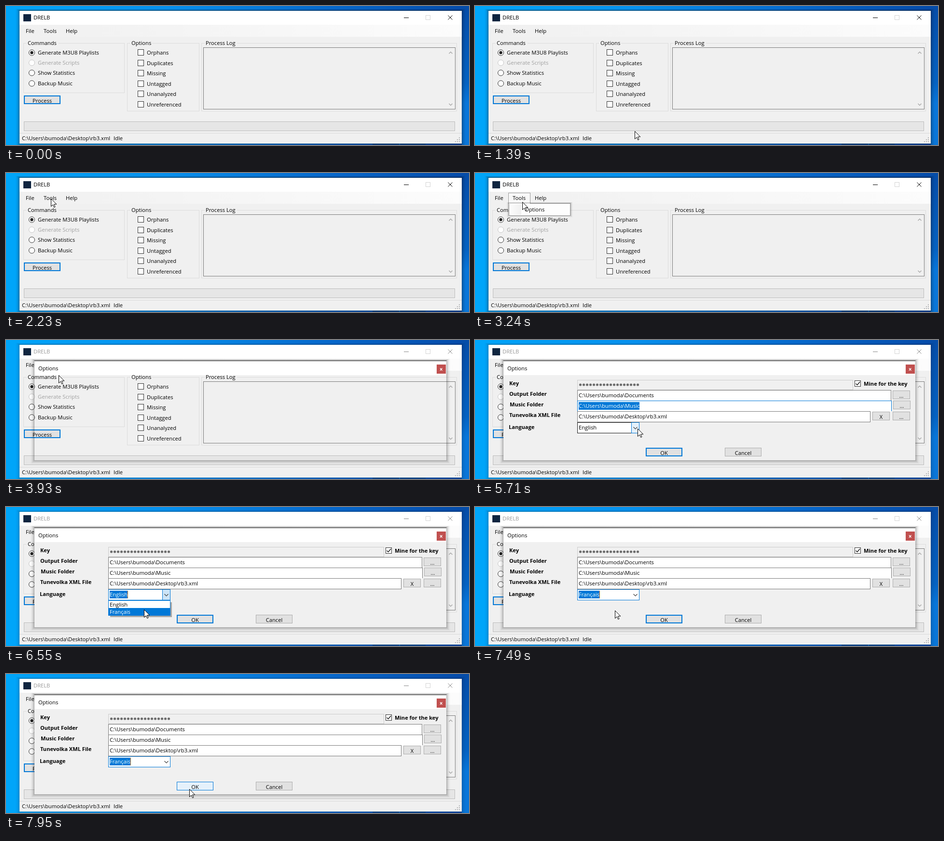
An HTML page for the animation above (8000 ms loop, 960x289 px).

```html
<!DOCTYPE html>
<html lang="en">
<head>
<meta charset="utf-8">
<title>Options dialog</title>
<style>
  html, body { margin: 0; width: 100%; height: 100%; overflow: hidden; background: #0a78dc; }
  svg { display: block; width: 100vw; height: 100vh; }
  text { font: 11.2px "Open Sans", "Noto Sans", sans-serif; fill: #000; white-space: pre; }
  text.bold { font-weight: 700; font-size: 11.1px; }
  rect { shape-rendering: crispEdges; }
</style>
</head>
<body>
<svg id="stage" viewBox="0 0 960 289" xmlns="http://www.w3.org/2000/svg"></svg>
<script>
const LOOP = 8000;
const BLUE = '#0078d7', HOT = '#e5f1fb', PRESSED = '#cce4f7', GRAY = '#7a7a7a', FACE = '#f0f0f0';
const HOME = String.raw`C:\Users\bumoda`;
const XML_PATH = HOME + String.raw`\Desktop\rb3.xml`;

// Markup helpers; box edges are given as left, top, right, bottom.
const fill = (x, y, r, b, color, extra = '') =>
  `<rect x="${x}" y="${y}" width="${r - x}" height="${b - y}" fill="${color}" ${extra}/>`;
const box = (x, y, r, b, color, edge, extra = '') =>
  `<rect x="${x + .5}" y="${y + .5}" width="${r - x - 1}" height="${b - y - 1}" fill="${color}" stroke="${edge}" ${extra}/>`;
const text = (x, y, str, extra = '') => `<text x="${x}" y="${y}" ${extra}>${str}</text>`;
const bold = (x, y, str) => text(x, y, str, 'class="bold"');
const path = (d, color = '#000', width = 1, extra = '') =>
  `<path d="${d}" fill="none" stroke="${color}" stroke-width="${width}" ${extra}/>`;
const group = (id, content) => `<g id="${id}">${content}</g>`;

const shadow = (x, y, r, b, size, strength) => Array.from({ length: size }, (_, i) =>
  `<rect x="${x - i - .5}" y="${y - i * .5 - .5}" width="${r - x + 2 * i + 1}" height="${b - y + 1.5 * i + 1}"
    fill="none" stroke="#000" opacity="${strength * (1 - i / size) ** 2}"/>`).join('');

const button = (x, y, label, width = 36, edge = '#adadad', extra = '') =>
  box(x, y, x + width, y + 18, '#e1e1e1', edge, extra) +
  text(x + width / 2, y + 15, label, 'text-anchor="middle"');

const defaultButton = (x, y, label, id) =>
  button(x, y, label, 76, BLUE, `id="${id}"`) +
  box(x + 1, y + 1, x + 75, y + 17, 'none', BLUE, `id="${id}Ring"`);

const frame = (x, y, r, b, label, labelWidth) =>
  box(x, y, r, b, 'none', '#dcdcdc') +
  fill(x + 7, y - 2, x + 9 + labelWidth, y + 3, FACE) + text(x + 9, y + 4, label);

const radio = (y, label, state = '') => {
  const off = state === 'off';
  return `<circle cx="53.5" cy="${y}" r="6" fill="#fff" stroke="${off ? '#c4c4c4' : '#333'}"/>` +
    (state === 'on' ? `<circle cx="53.5" cy="${y}" r="3.2" fill="#222"/>` : '') +
    text(66, y + 4, label, off ? 'style="fill:#a0a0a0"' : '');
};

const check = (y, label) => box(273, y - 7, 286, y + 6, '#fff', '#333') + text(292, y + 4, label);

const desktop = `
  <defs>
    <linearGradient id="sky"><stop stop-color="#00a6fa"/><stop offset=".35" stop-color="#0690ee"/>
      <stop offset=".7" stop-color="#0668cc"/><stop offset="1" stop-color="#054aa8"/></linearGradient>
    <linearGradient id="side" x2="0" y2="1"><stop stop-color="#054ca8"/><stop offset=".55" stop-color="#0562c2"/>
      <stop offset=".7" stop-color="#0876da"/><stop offset="1" stop-color="#0a76d8"/></linearGradient>
    <linearGradient id="bar"><stop stop-color="${FACE}"/><stop offset="1" stop-color="#fcfcfc"/></linearGradient>
    <linearGradient id="margin"><stop stop-color="#fcfcfc"/><stop offset="1" stop-color="#f0f0f0"/></linearGradient>
  </defs>` +
  fill(0, 0, 960, 289, 'url(#sky)') + fill(945, 0, 960, 289, 'url(#side)') +
  fill(760, 286, 870, 289, '#0a4f98') + fill(815, 286, 817, 289, '#1b6fc0');

const grip = [[0, 0], [4, 0], [8, 0], [4, -4], [8, -4], [8, -8]]
  .map(([x, y]) => fill(931 + x, 281 + y, 933 + x, 283 + y, '#b4b4b4')).join('');

const mainWindow =
  group('mainShadow', shadow(28, 10, 945, 286, 9, .3)) +
  fill(28, 10, 945, 286, FACE) + fill(28, 10, 945, 39, '#fff') + fill(28, 39, 945, 64, 'url(#bar)') +
  fill(36, 17, 52, 32, '#0f2540') +
  text(57, 28, 'DRELB', 'id="title"') +
  group('controls', path('M825 24.5h10M916.5 19.5l9 9m0-9l-9 9', 'currentColor')) +
  box(870, 19, 880, 29, 'none', '#d4d4d4') +
  text(41, 56, 'File') +
  group('toolsHot', box(69, 41, 115, 63, '#b3d7f3', BLUE)) +
  group('toolsOpen', box(69, 41, 115, 64, '#f8f8f8', '#9b9b9b')) +
  text(78, 56, 'Tools') + text(124, 56, 'Help') +
  frame(36, 77, 246, 181, 'Commands', 64) +
  radio(97, 'Generate M3U8 Playlists', 'on') + radio(118, 'Generate Scripts', 'off') +
  radio(139, 'Show Statistics') + radio(161, 'Backup Music') +
  frame(251, 77, 401, 219, 'Options', 43) +
  ['Orphans', 'Duplicates', 'Missing', 'Untagged', 'Unanalyzed', 'Unreferenced']
    .map((label, i) => check(Math.round(97 + i * 21.6), label)).join('') +
  frame(405, 77, 935, 219, 'Process Log', 65) +
  box(409, 86, 932, 215, FACE, GRAY) +
  path('M918.5 99l3.5-3.5 3.5 3.5M918.5 203l3.5 3.5 3.5-3.5', '#aaa', 1.5) +
  defaultButton(37, 186, 'Process', 'process') +
  box(37, 240, 931, 260, '#e6e6e6', '#bcbcbc') +
  fill(28, 264, 945, 265, '#d9d9d9') +
  text(33, 279, XML_PATH) + text(223, 279, 'Idle') + grip;

const toolsMenu = group('menu',
  shadow(70, 63, 198, 88, 5, .22) + box(70, 63, 198, 89, '#fdfdfd', '#9b9b9b') +
  fill(72, 65, 96, 87, 'url(#margin)') + fill(70, 63, 114, 64, '#f8f8f8') +
  group('menuHot', box(72, 65, 196, 87, '#b3d7f3', BLUE)) + text(103, 80, 'Options'));

const dots = Array.from({ length: 18 }, (_, i) =>
  `<circle cx="${218.5 + i * 7}" cy="93" r="2.6" fill="#6d6d6d"/>`).join('');

const dialogBody = group('body',
  fill(59, 73, 913, 250, FACE) +
  bold(71, 94, 'Key') + bold(71, 116, 'Output Folder') + bold(72, 138, 'Music Folder') +
  bold(71, 160, 'Tunevolka XML File') + bold(70, 185, 'Language') +
  box(212, 83, 784, 104, FACE, '#ccc') + dots +
  box(787, 84, 800, 97, '#fff', '#333') + path('M789.5 90.5l3 3 5.5-6.5', '#111', 1.4) +
  bold(806, 95, 'Mine for the key') +
  box(212, 104, 863, 127, '#fff', GRAY) + text(215, 119, HOME + '\\Documents') +
  box(212, 126, 864, 149, '#fff', GRAY, 'id="musicBox"') + fill(820, 148, 864, 149, '#fff') +
  fill(215, 129, 216, 145, BLUE, 'id="musicSel"') + text(215, 141, HOME + '\\Music', 'id="music"') +
  box(212, 148, 820, 171, '#fff', GRAY, 'id="xmlBox"') + text(215, 163, XML_PATH) +
  button(866, 105, '...') + button(867, 126, '...') + button(866, 149, '...') + button(824, 149, 'X') +
  box(212, 171, 341, 194, '#fff', GRAY, 'id="combo"') +
  box(324, 171, 341, 194, HOT, BLUE, 'id="comboHot"') +
  path('M328.5 181l4 4 4-4', '#444', 1.2) +
  fill(215, 174, 216, 190, BLUE, 'id="langSel"') + fill(258, 174, 259, 190, '#ff8728', 'id="caret"') +
  text(215, 186, 'English', 'id="lang"') +
  defaultButton(354, 224, 'OK', 'ok') + button(518, 224, 'Cancel', 76) +
  group('list',
    fill(216, 226, 344, 229, '#000', 'opacity=".3"') + fill(341, 198, 344, 226, '#000', 'opacity=".3"') +
    box(212, 194, 341, 226, '#fff', BLUE) + fill(213, 195, 340, 210, BLUE, 'id="row"') +
    text(215, 207, 'English', 'id="row0"') + text(215, 222, 'Français', 'id="row1"')));

const dialog = group('dialog',
  shadow(59, 43, 913, 250, 9, .26) +
  fill(59, 43, 913, 73, '#fff') + fill(59, 43, 913, 44, '#555') +
  text(67, 63, 'Options') +
  fill(893, 51, 912, 70, '#c0504f') + path('M900 58.5l4.5 5m0-5l-4.5 5', '#fff', 1.3) +
  dialogBody);

const pointer = group('cursor',
  `<path id="arrow" d="M.5 .5v16l3.7-3.5 2.6 5.5 2.2-1-2.5-5.5h5.3z" fill="#fff" stroke="#000"/>` +
  path('M-3 -8.5h2.5l.5.5.5-.5h2.5M0 -8v16M-3 8.5h2.5l.5-.5.5.5h2.5', '#000', 1, 'id="beam"'));

const stage = document.getElementById('stage');
stage.innerHTML = desktop + mainWindow + toolsMenu + dialog + pointer;
const el = {};
stage.querySelectorAll('[id]').forEach(node => el[node.id] = node);

// Each move: first change, last change, then [step, x, y] points.
const moves = [
  [1310, 2080, [0, 355, 284], [3, 282, 212], [6, 165, 112], [8, 112, 74], [10, 95, 60]],
  [2150, 2230, [0, 94, 56], [1, 93, 53]],
  [3160, 3470, [0, 94, 55], [2, 102, 65], [4, 109, 73]],
  [4330, 5090, [0, 122, 80], [4, 290, 148], [10, 308, 164]],
  [5170, 5710, [0, 310, 166], [4, 326, 177], [7, 337, 184]],
  [6170, 6550, [0, 334, 186], [3, 302, 206], [5, 286, 213]],
  [7490, 7950, [0, 290, 215], [3, 340, 230], [6, 380, 239]],
];

function cursorAt(time) {
  const move = moves.filter(([start]) => start <= time).pop();
  if (!move) return null;
  const [start, end, ...points] = move;
  const last = points[points.length - 1];
  const step = Math.min(last[0], Math.floor((time - start + 4) / (end - start) * last[0]));
  const next = Math.max(1, points.findIndex(p => p[0] >= step));
  const [a, b] = [points[next - 1], points[next]];
  const k = (step - a[0]) / (b[0] - a[0]);
  return [1, 2].map(i => Math.round(a[i] + (b[i] - a[i]) * k));
}

const show = (node, on) => node.setAttribute('display', on ? 'inline' : 'none');
const color = (node, value) => node.style.fill = value;
const edge = (node, value) => node.setAttribute('stroke', value);

function select(bar, label, on) {
  show(bar, on);
  color(label, on ? '#fff' : '#000');
  if (on) bar.setAttribute('width', Math.round(label.getComputedTextLength()));
}

function render(time) {
  const pos = cursorAt(time);
  const [x, y] = pos || [0, 0];
  const inside = (l, t, r, b) => x >= l && x < r && y >= t && y < b;
  const opened = time >= 3930, ready = time >= 4010;
  const menuOpen = time >= 2780 && !opened;
  const comboFocus = time >= 5860, listOpen = time >= 5940 && time < 7030;
  const french = time >= 7030;

  color(el.title, opened ? '#999' : '#000');
  el.controls.style.color = opened ? '#888' : '#000';
  el.mainShadow.setAttribute('opacity', opened ? .55 : 1);
  show(el.toolsHot, time >= 2610 && time < 2780);
  show(el.toolsOpen, menuOpen);
  show(el.menu, menuOpen);
  show(el.menuHot, menuOpen && y >= 65);
  show(el.dialog, opened);
  show(el.body, ready);

  const overXml = ready && inside(212, 149, 820, 171);
  const overCombo = ready && inside(212, 171, 341, 194);
  edge(el.musicBox, comboFocus ? GRAY : BLUE);
  select(el.musicSel, el.music, !comboFocus);
  edge(el.xmlBox, overXml ? '#171717' : GRAY);

  el.lang.textContent = french ? 'Français' : 'English';
  select(el.langSel, el.lang, comboFocus);
  show(el.caret, comboFocus);
  el.caret.setAttribute('x', 215 + Math.round(el.lang.getComputedTextLength()));
  edge(el.combo, comboFocus ? BLUE : overCombo ? '#171717' : GRAY);
  show(el.comboHot, listOpen || overCombo);
  color(el.comboHot, listOpen ? PRESSED : HOT);

  const row = inside(212, 210, 341, 226) ? 1 : 0;
  show(el.list, listOpen);
  el.row.setAttribute('y', 195 + row * 15);
  color(el.row0, row ? '#000' : '#fff');
  color(el.row1, row ? '#fff' : '#000');

  const overOk = ready && inside(354, 224, 430, 242);
  color(el.ok, overOk ? HOT : '#e1e1e1');
  show(el.okRing, !overOk);

  show(el.cursor, pos);
  show(el.beam, overXml || (ready && inside(212, 104, 863, 149)));
  show(el.arrow, el.beam.getAttribute('display') === 'none');
  el.cursor.setAttribute('transform', `translate(${x} ${y})`);
}

const began = performance.now();
function tick() {
  render((performance.now() - began) % LOOP);
  requestAnimationFrame(tick);
}
tick();
</script>
</body>
</html>
```
